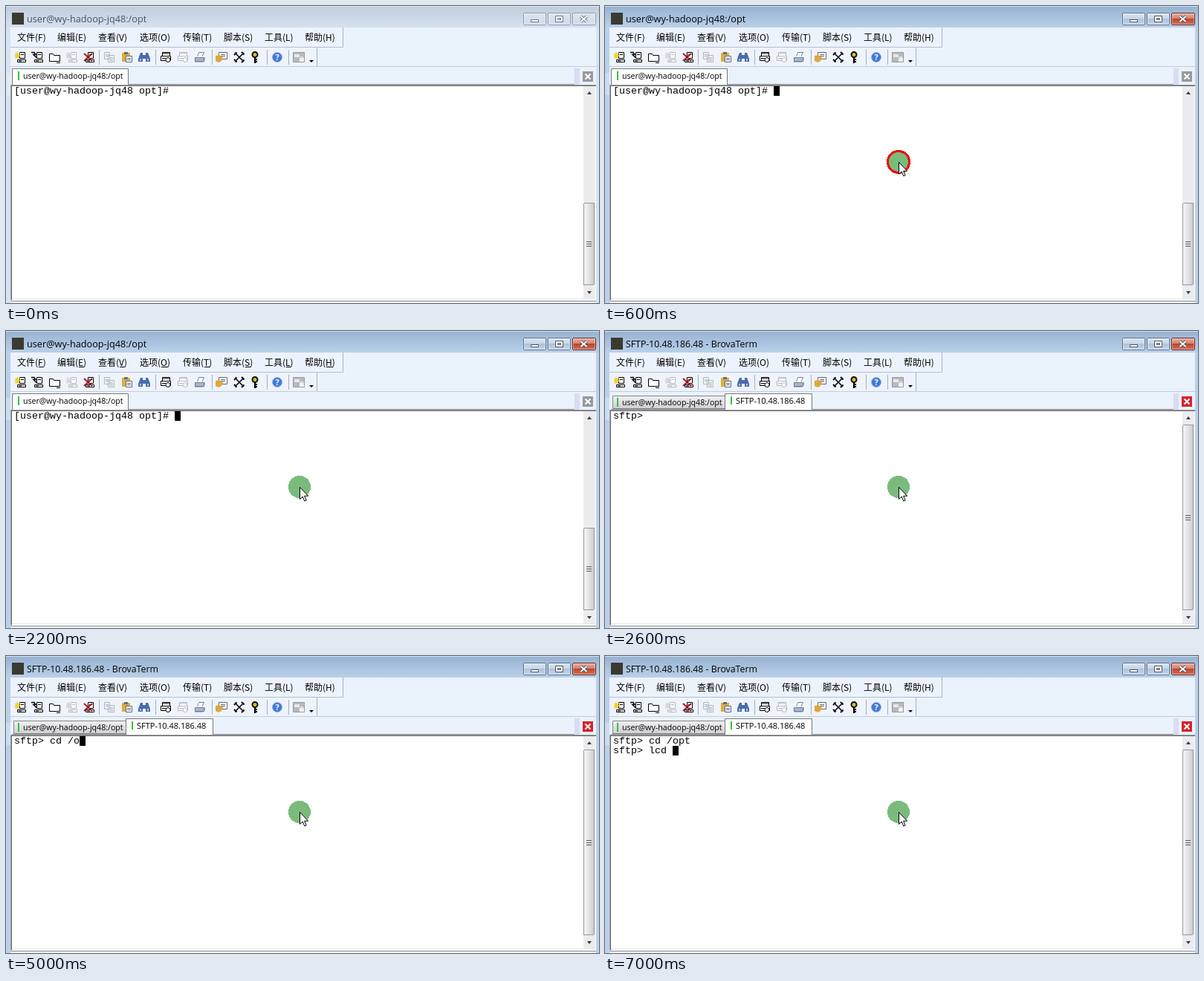
Recreate the animation shown at these times as an HTML page. Size 798x400 px, loop 8000 ms.

```html
<!DOCTYPE html>
<html lang="zh">
<head>
<meta charset="utf-8">
<title>Terminal session</title>
<style>
html, body { margin: 0; width: 100%; height: 100%; overflow: hidden; }
svg { display: block; }
rect, #mouse circle { shape-rendering: crispEdges; }
text { white-space: pre; }
.ui { font-family: "Open Sans", sans-serif; }
.menu { font: 12px "Noto Sans CJK SC", "Noto Sans CJK", sans-serif; }
.tab { font-size: 10.6px; }
.term { font: 13.333px "Liberation Mono", monospace; }
.line { fill: none; stroke: currentColor; }
.white { fill: #fff; }
.dim { color: #b4b7bc; }
</style>
</head>
<body>
<svg width="798" height="400" viewBox="0 0 798 400">
  <defs>
    <linearGradient id="idle" x2="0" y2="1"><stop stop-color="#bfcddd"/><stop offset="1" stop-color="#d5e1ef"/></linearGradient>
    <linearGradient id="live" x2="0" y2="1"><stop stop-color="#96b2d1"/><stop offset="1" stop-color="#bad0e9"/></linearGradient>
    <linearGradient id="glass" x2="0" y2="1"><stop stop-color="#dbe6f2"/><stop offset=".48" stop-color="#c6d6e8"/><stop offset=".5" stop-color="#aec3da"/><stop offset="1" stop-color="#c3d6ea"/></linearGradient>
    <linearGradient id="pale" x2="0" y2="1"><stop stop-color="#dbe5ef"/><stop offset="1" stop-color="#cfdcea"/></linearGradient>
    <linearGradient id="red" x2="0" y2="1"><stop stop-color="#e6b0a3"/><stop offset=".48" stop-color="#d5806c"/><stop offset=".5" stop-color="#bf4329"/><stop offset="1" stop-color="#d4745a"/></linearGradient>
    <linearGradient id="tabBg" x2="0" y2="1"><stop stop-color="#f1f1f3"/><stop offset="1" stop-color="#cfcfd4"/></linearGradient>
    <linearGradient id="thumbBg"><stop stop-color="#f6f6f6"/><stop offset=".5" stop-color="#e4e4e5"/><stop offset="1" stop-color="#c9cacd"/></linearGradient>
    <g id="pc">
      <path class="line white" d="M7.500 1.500h7v8h-7zM4.500 14.500v-3h11v3z"/>
      <path class="line" d="M9 4.500h4M6 13h4"/>
    </g>
    <g id="printer">
      <path class="line white" d="M3.500 6V1.500h10V6M1.500 6.500h13v6h-13z"/>
      <path class="line" d="M4 3h9M3 9.500h5"/>
      <circle class="line white" cx="11" cy="11.500" r="3"/>
    </g>
  </defs>

  <!-- window frame -->
  <rect id="frame" width="798" height="400"/>
  <rect id="bar" width="798" height="29"/>
  <rect width="798" height="1" fill="#fff" opacity=".6"/>
  <rect y="90" width="6" height="30" fill="#fff" opacity=".25"/>
  <rect x="8" y="9" width="16" height="16" fill="#3a3a30"/>
  <text id="title" class="ui" x="28" y="22"></text>
  <g id="buttons"></g>

  <!-- menu, toolbar, tab row -->
  <rect x="6" y="29" width="788" height="78" fill="#eaf2fc"/>
  <rect x="6" y="29" width="448" height="26" fill="#edf3fd"/>
  <rect x="453" y="29" width="1" height="27" fill="#a8b3c3"/>
  <rect x="6" y="55" width="448" height="1" fill="#b4bfce"/>
  <rect x="6" y="56" width="412" height="25" fill="#eef3fc"/>
  <rect x="418" y="56" width="1" height="26" fill="#a8b3c3"/>
  <rect x="6" y="81" width="788" height="1" fill="#c3ccd9"/>
  <g id="menu" class="menu"></g>
  <g id="under"></g>
  <g id="tools"></g>
  <rect x="8" y="105" width="757" height="1" fill="#8d8d94"/>
  <rect x="765" y="84" width="7" height="22" fill="#d9dcf2"/>
  <g class="ui tab">
    <g id="one">
      <path d="M8.500 106V84.500H164.500V106" fill="#fff" stroke="#77777c"/>
      <rect x="16" y="88" width="2" height="12" fill="#35c435"/>
      <text x="23" y="98">user@wy-hadoop-jq48:/opt</text>
    </g>
    <g id="two">
      <path d="M10.500 104.500V87.500H162V104.500z" fill="url(#tabBg)" stroke="#85858b"/>
      <rect x="16" y="90" width="2" height="12" fill="#35c435"/>
      <text x="23" y="100">user@wy-hadoop-jq48:/opt</text>
      <path d="M161.500 106V84.500H278.500V106" fill="#fff" stroke="#77777c"/>
      <rect x="169" y="88" width="2" height="11" fill="#35c435"/>
      <text x="176" y="98" font-size="11">SFTP-10.48.186.48</text>
    </g>
  </g>
  <rect id="shut" x="776" y="88" width="14" height="14"/>
  <path d="M779.500 91.500l7 7m0-7l-7 7" stroke="#fff" stroke-width="2"/>

  <!-- terminal -->
  <rect x="6" y="106" width="788" height="290" fill="#a0a0a0"/>
  <rect x="7" y="107" width="787" height="289" fill="#696969"/>
  <rect x="8" y="108" width="786" height="288" fill="#fff"/>
  <rect x="8" y="394" width="785" height="1" fill="#e3e3e3"/>
  <rect x="777" y="108" width="16" height="286" fill="#ececee"/>
  <path d="M782 119h6l-3-4zM782 384h6l-3 4z" fill="#3c3c40"/>
  <rect id="thumb" x="777.500" width="14" rx="1.500" fill="url(#thumbBg)" stroke="#94979b"/>
  <path id="grip" stroke="#55585c"/>
  <rect x="6" y="396" width="788" height="1" fill="#f0f0f0"/>
  <rect x="6" y="397" width="788" height="1" fill="#8e9298"/>
  <rect x="6" y="398" width="788" height="2" fill="#f2f3f5"/>
  <g class="term"><text id="l0" x="11" y="118"></text><text id="l1" x="11" y="131"></text></g>
  <rect id="caret" width="8" height="13"/>

  <!-- pointer with highlight -->
  <g id="mouse">
    <circle r="15" fill="#7abb7c"/>
    <circle id="ring" r="14.500" fill="none" stroke="#f00000" stroke-width="3"/>
    <path d="M.5.500V16.500L4.200 13l2.600 6 2.400-1-2.600-5.800h5z" fill="#fff" stroke="#000"/>
  </g>
</svg>
<script>
const $ = id => document.getElementById(id);
const set = (id, attrs) => { for (const k in attrs) $(id).setAttribute(k, attrs[k]); };
const show = (id, on) => set(id, { visibility: on ? 'visible' : 'hidden' });

// label, left edge, underline width
const menus = [['文件(F)', 16, 6], ['编辑(E)', 70, 7], ['查看(V)', 125, 7], ['选项(O)', 181, 9],
  ['传输(T)', 239, 7], ['脚本(S)', 294, 7], ['工具(L)', 349, 6], ['帮助(H)', 403, 9]];
$('menu').innerHTML = menus.map(([s, x]) => `<text x="${x - 1}" y="47">${s}</text>`).join('');
$('under').innerHTML = menus.map(([, x, w]) => `<rect x="${x + 28}" y="48" width="${w}" height="1"/>`).join('');

const pc = '<use href="#pc"/>', printer = '<use href="#printer"/>';
const line = (d, extra = '') => `<path class="line" d="${d}" ${extra}/>`;
const fill = (d, c) => `<path d="${d}" fill="${c}"/>`;
const spark = c => fill('M4 0l1 3 3-1-1 3 2 1-2 1 0 3-3-1-3 1 1-3-2-1 2-1-1-3 2 1z', c);
const bolt = line('M0 1.500h4l2 3H3l4 4', 'stroke-width="1.500"');
const pages = line('M1.500 1.500h7v9h-7zM6.500 5.500h8v9h-8zM3 4.500h4M3 6.500h3M8 8.500h5M8 10.500h5M8 12.500h5');

// left edge, drawing in a 16px box, greyed
const icons = [
  [11, pc + spark('#ecd23a')],
  [34, pc + bolt],
  [57, '<path class="line white" d="M1.500 13.500v-10h5l1 2h8v8z"/>' + line('M11 15.500h5')],
  [80, pc + spark('#d5d7db'), 1],
  [103, pc + '<path d="M2 3l11 10M13 3L2 13" stroke="#a81820" stroke-width="2"/>'],
  [131, pages, 1],
  [155, fill('M1 2h11v12H1z', '#dcae3e') + fill('M4 1h5v3H4z', '#6c6c72') +
    '<path d="M6.500 6.500h8v8h-8zM8 9.500h5M8 11.500h5" fill="#fff" stroke="#56688d"/>'],
  [178, fill('M3 2h3v3h4V2h3l3 8v4h-6v-4H6v4H0v-4z', '#4a6cae') + fill('M2 10h2v3H2zM12 10h2v3h-2z', '#a9c4ee')],
  [207, printer],
  [230, printer, 1],
  [253, fill('M5 1h9l-2 7H3z', '#fff') + fill('M1 8h14v4l-3 3H1z', '#a9b6cb') +
    '<path d="M4.500 7l2-5.500h7L11 7M1.500 8.500h12v5h-12z" fill="none" stroke="#6d7d96"/>'],
  [282, '<path d="M4.500 1.500h11v9h-11zM7 4.500h6M7 6.500h6" fill="#fff" stroke="#65686f"/>' +
    fill('M0 6l5-1 5 3-2 5-4 2-4-2z', '#dca83c')],
  [306, line('M2 2l12 12M14 2L2 14', 'stroke-width="1.500"') +
    line('M1 5l4-4M11 1l4 4M1 11l4 4M11 15l4-4', 'stroke-width="2" stroke-dasharray="2 1"')],
  [327, '<circle cx="8" cy="4.500" r="3.500" fill="#d8bd25" stroke="#111" stroke-width="2"/>' +
    line('M8 8v8M8 11h3M8 14h3', 'stroke-width="2"')],
  [357, '<circle cx="8" cy="8" r="6.500" fill="#4079d8" stroke="#8fb2ea"/>' +
    '<text class="ui" x="8" y="12" font-size="11" font-weight="700" fill="#fff" text-anchor="middle">?</text>'],
  [386, '<path d="M.5 1.500h15v13H.5z" fill="#b8babd" stroke="#96999d"/>' +
    fill('M2 4h7v4H2z', '#e8e8ea') + fill('M9 9h6v5H9z', '#f2f2f2') + '<path d="M10.500 9V7.500h3V9" fill="none" stroke="#eee"/>']
];
$('tools').innerHTML =
  icons.map(([x, art, dim]) => `<g transform="translate(${x} 61)" class="${dim ? 'dim' : ''}">${art}</g>`).join('') +
  [125, 201, 277, 351, 380].map(x => `<rect x="${x}" y="59" width="1" height="20" fill="#a5afbd"/>`).join('') +
  fill('M408 73h6l-3 3z', '#000');

function drawButtons(active) {
  const box = (x, w, paint, edge) =>
    `<rect x="${x}.500" y="9.500" width="${w}" height="16" rx="2" fill="url(#${paint})" stroke="${edge}"/>
     <rect x="${x + 1}.500" y="10.500" width="${w - 2}" height="14" fill="none" stroke="#fff" opacity=".4"/>`;
  const skin = active ? 'glass' : 'pale', edge = active ? '#62748b' : '#8f9cab', ink = active ? '#4d5663' : '#6b7582';
  $('buttons').innerHTML = box(696, 30, skin, edge) + box(729, 30, skin, edge) +
    (active ? box(762, 31, 'red', '#6b2a23') : box(762, 31, skin, edge)) +
    `<g fill="#fff" stroke="${ink}"><path d="M706.500 18.500h10v3h-10z"/>
     <path d="M739.500 13.500h10v8h-10zM742.500 16.500h4v2h-4z" fill-rule="evenodd"/></g>
     <path d="M773.500 14l8 7m0-7l-8 7" stroke="${ink}" stroke-width="4"/>
     <path d="M773.500 14l8 7m0-7l-8 7" stroke="#fff" stroke-width="2"/>`;
}

// start time, terminal text, caret visible
const shell = '[user@wy-hadoop-jq48 opt]#', ftp = 'sftp> ', cd = ftp + 'cd /opt\n' + ftp;
const steps = [
  [0, shell, 0], [600, shell + ' ', 1], [1800, shell + ' ', 0], [2200, shell + ' ', 1],
  [2600, ftp, 0], [2800, ftp, 1], [3400, ftp, 0], [3800, ftp + 'c', 0], [4000, ftp + 'cd', 1],
  [4200, ftp + 'cd ', 1], [4400, ftp + 'cd /', 1], [5000, ftp + 'cd /o', 1], [5200, ftp + 'cd /op', 1],
  [5400, ftp + 'cd /opt', 1], [5800, cd, 0], [6000, cd, 1], [6400, cd + 'l', 1],
  [6800, cd + 'lc', 1], [7000, cd + 'lcd ', 1]
];
const stops = [[0, 407, 224], [400, 397, 223], [600, 395, 210]];
const at = (list, t) => list.filter(e => e[0] <= t).pop();

let wasActive;
function draw(t) {
  const active = t >= 600, sftp = t >= 2600;
  if (active !== wasActive) drawButtons(wasActive = active);
  set('frame', { fill: active ? '#bad1ea' : '#d6e3f2' });
  set('bar', { fill: active ? 'url(#live)' : 'url(#idle)' });
  $('title').textContent = sftp ? 'SFTP-10.48.186.48 - BrovaTerm' : 'user@wy-hadoop-jq48:/opt';
  set('title', { 'font-size': sftp ? 12.3 : 12.7, fill: active ? '#000' : '#4b535d' });
  show('under', t >= 2000 && !sftp);
  show('one', !sftp);
  show('two', sftp);
  set('shut', { fill: sftp ? '#d8232b' : '#99999c' });

  const top = sftp ? 126 : 265, mid = (top + 376) >> 1;
  set('thumb', { y: top + .5, height: 375 - top });
  set('grip', { d: [-2.5, .5, 3.5].map(dy => `M781 ${mid + dy}h7`).join('') });

  const [, text, caret] = at(steps, t), lines = text.split('\n'), last = lines.length - 1;
  $('l0').textContent = lines[0];
  $('l1').textContent = lines[1] || '';
  set('caret', { x: 11 + 8 * lines[last].length, y: 108 + 13 * last });
  show('caret', caret);

  const [, x, y] = at(stops, t);
  set('mouse', { transform: `translate(${x} ${y})`, display: t < 200 ? 'none' : 'inline' });
  show('ring', t >= 600 && t < 800);
}

const start = performance.now();
function tick() {
  draw((performance.now() - start) % 8000);
  requestAnimationFrame(tick);
}
tick();
</script>
</body>
</html>
```
